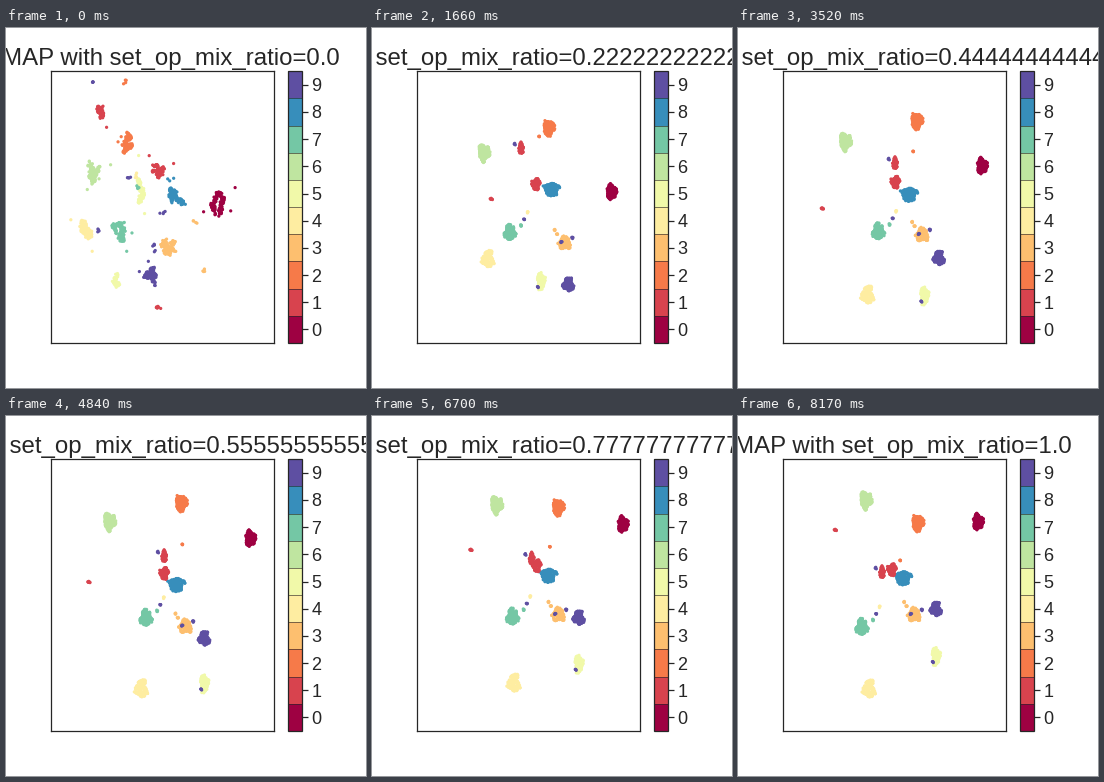
A matplotlib script that plays this animation: 360x360 px, repeating every 8360 ms.

```python
import numpy as np
import matplotlib.pyplot as plt
from matplotlib.animation import FuncAnimation

LOOP, TICK = 8360, 20                      # ms
FIRST_MOVE, SEGMENT, STEP, STEPS = 190, 930, 30, 19
COUNT = 10
INK = "0.15"
KEYS = (0, 1, 3, 5, 9)                     # settings at which a path has a point

plt.rcParams.update({
    "font.family": "Liberation Sans", "text.color": INK, "ytick.color": INK,
    "axes.edgecolor": INK, "axes.linewidth": 1.25, "axes.titlesize": 24,
    "ytick.labelsize": 18, "ytick.major.size": 6, "ytick.major.width": 1.25,
})
rng = np.random.default_rng(12)
settings = np.arange(COUNT)
looseness = np.exp(-1.6 * settings)[:, None, None]
sway = np.sin(np.pi * np.clip(settings - 5, 0, 4) / 4)[:, None] * (9, -6)
tracks, labels = [], []


def path(*points):
    x, y = np.transpose(points)
    return np.column_stack([np.interp(settings, KEYS, x), np.interp(settings, KEYS, y)]) + sway


def filaments(n, knots=8):
    """Points strewn along a random line through the unit disk."""
    angle = rng.uniform(0, 2 * np.pi, knots)
    line = np.sqrt(rng.uniform(0.1, 1, knots)) * (np.cos(angle), np.sin(angle))
    along = rng.uniform(0, knots - 1, n)
    points = np.column_stack([np.interp(along, np.arange(knots), axis) for axis in line])
    points[rng.random(n) < 0.025] *= 3
    return points


def lump(n):
    """Points filling a disk with an uneven outline."""
    angle = rng.uniform(0, 2 * np.pi, n)
    a, b = rng.uniform(0, 2 * np.pi, 2)
    radius = 0.85 + 0.14 * np.sin(3 * angle + a) + 0.09 * np.sin(5 * angle + b)
    radius *= np.sqrt(rng.random(n))
    return np.column_stack([radius * np.cos(angle), radius * np.sin(angle)])


def cluster(label, n, size, centres):
    """Loose filaments at the first setting, dense lumps at the later ones."""
    size = np.array(size)
    loose = filaments(n) * size * (1.2, 1.4) + rng.normal(0, 0.9, (n, 2))
    shape = looseness * loose + (1 - looseness) * lump(n) * size
    tracks.append(centres[:, None] + shape)
    labels.extend([label] * n)


def guest(label, host, *offset):
    """A few points that wander in and then stay beside another cluster."""
    centres = host + np.array(offset)
    centres[0] += rng.normal(0, 22, 2)
    cluster(label, 4, (1, 1), centres)


zero = path((212, 176), (235, 175), (244, 153), (244, 123), (240, 106))
one_top = path((94, 84), (142, 111), (156, 131), (158, 141), (144, 157))
one_mid = path((152, 142), (171, 162), (157, 151), (158, 158), (154, 154))
one_far = path((153, 279), (152, 148), (86, 194), (82, 167), (97, 114))
two = path((122, 116), (171, 101), (183, 99), (175, 87), (180, 107))
three = path((162, 216), (196, 227), (189, 203), (179, 211), (176, 199))
four = path((82, 200), (108, 201), (124, 261), (135, 273), (131, 273))
five = path((133, 164), (163, 239), (175, 267), (198, 268), (198, 240))
six = path((86, 143), (112, 128), (112, 121), (103, 106), (128, 84))
seven = path((112, 205), (135, 204), (141, 205), (140, 202), (124, 211))
eight = path((169, 170), (187, 159), (172, 164), (170, 169), (165, 162))
nine = path((145, 249), (189, 276), (204, 237), (198, 223), (198, 193))
five_low = five.copy()
five_low[0] = 111, 251

cluster(6, 170, (6.5, 10), six)
cluster(4, 150, (7, 10), four)
cluster(5, 100, (4.5, 11), five)
cluster(5, 40, (4, 7), five_low)
cluster(7, 150, (6.5, 9.5), seven)
cluster(3, 130, (7.5, 7.5), three)
cluster(2, 140, (7, 9), two)
cluster(8, 150, (9, 8), eight)
cluster(1, 60, (3, 7), one_top)
cluster(1, 80, (5, 7), one_mid)
cluster(0, 150, (6, 9), zero)
cluster(9, 140, (6, 8), nine)
cluster(1, 6, (1.5, 1.5), one_far)

guest(2, one_top, 18, -12)
guest(3, three, -10, -13)
guest(3, three, -7, -9)
guest(4, seven, 18, -20)
guest(7, seven, 11, -7)
guest(9, seven, 14, -13)
guest(9, one_top, -6, -5)
guest(9, five, -3, 6)
guest(9, three, 8, -5)
guest(9, three, -3, -1)

poses = np.concatenate(tracks, axis=1)

fig, ax = plt.subplots(figsize=(5, 5), dpi=72, facecolor="white")
fig.subplots_adjust(left=0.125, right=0.9, bottom=0.125, top=0.88)
points = ax.scatter(*poses[0].T, s=10.5, c=labels, cmap="Spectral", linewidths=0)
bar = fig.colorbar(points, ax=ax, boundaries=np.arange(COUNT + 1) - 0.5,
                   ticks=settings, drawedges=True)
bar.dividers.set_linewidth(0.6)
# Data units are stage pixels, counted from the top left.
ax.set(xlim=(45, 268.2), ylim=(315, 43.2), xticks=[], yticks=[])


def draw(frame):
    time = frame * TICK + TICK / 2 - FIRST_MOVE
    key = int(np.clip(time // SEGMENT, 0, COUNT - 2))
    step = np.clip((time - key * SEGMENT) // STEP + 1, 0, STEPS)
    mix = step / STEPS
    points.set_offsets((1 - mix) * poses[key] + mix * poses[key + 1])
    ratio = (key + int(mix > 0.5)) / (COUNT - 1)
    ax.set_title(f"MAP with set_op_mix_ratio={ratio}", x=0.539)
    return (points,)


animation = FuncAnimation(fig, draw, frames=LOOP // TICK, interval=TICK,
                          repeat=True, repeat_delay=0, blit=False)
plt.show()
```
